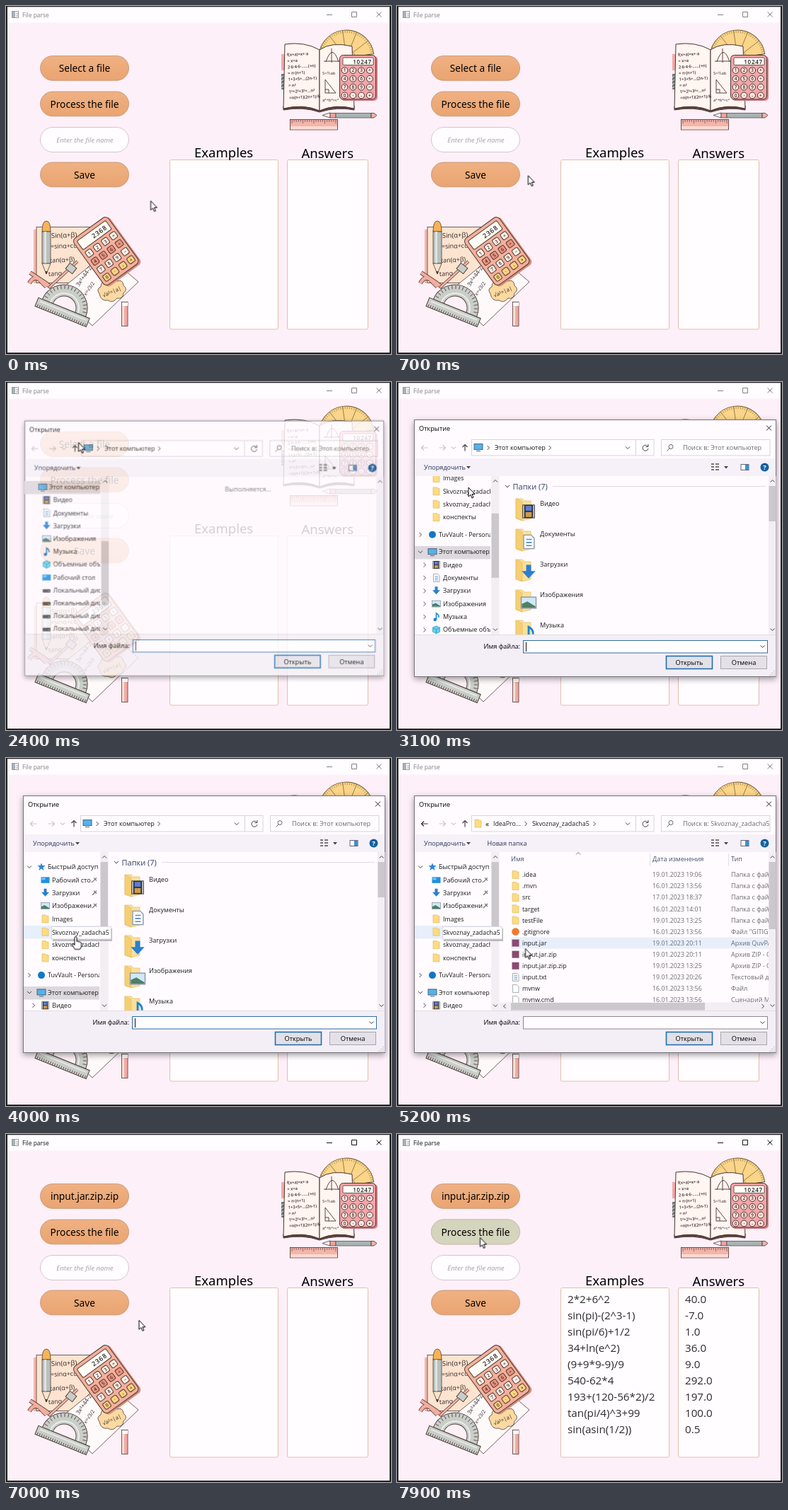
An HTML page for the animation above (8 s loop, 544 by 492 pixels).

```html
<!DOCTYPE html>
<html lang="ru">
<head>
<meta charset="utf-8">
<title>File parse</title>
<style>
html, body { margin: 0; width: 100%; height: 100%; overflow: hidden; background: #222; }
svg { display: block; width: 544px; height: 492px; font-family: "Open Sans", "Noto Sans", sans-serif; }
text { white-space: pre; }
.hand { font-family: "Noto Sans", "Open Sans", sans-serif; }
.note { fill: #33262a; }
.mid { text-anchor: middle; }
.step { animation: 8s step-end infinite; }
#cursor { animation: move 8s ease-in-out infinite; }
#dialog { animation: dialog 8s linear infinite; transform-origin: 280px 235px; }
#tree { animation: scroll 8s linear infinite; }
#thumb { animation: thumb 8s linear infinite; }
@keyframes move {
  0%, 5% { transform: translate(204.5px, 275.5px); }
  17.5%, 35% { transform: translate(102.5px, 85.5px); }
  43.75%, 58.75% { transform: translate(98.5px, 252.5px); }
  65%, 67.5% { transform: translate(181.5px, 269.5px); }
  70%, 85% { transform: translate(202.5px, 287.5px); }
  93.75%, 100% { transform: translate(117.5px, 146.5px); }
}
@keyframes dialog {
  0%, 28.75% { opacity: 0; transform: scale(.975); }
  30% { opacity: .83; transform: scale(.992); }
  31.25%, 72.5% { opacity: 1; transform: none; }
  73.75% { opacity: .4; transform: scale(.985); }
  75%, 100% { opacity: 0; transform: scale(.97); }
}
@keyframes scroll {
  0%, 36.25% { transform: translateY(-183.5px); }
  41.25%, 100% { transform: none; }
}
@keyframes thumb {
  0%, 36.25% { transform: translateY(78px); }
  41.25%, 100% { transform: none; }
}
</style>
</head>
<body>
<svg id="stage" viewBox="0 0 544 492"></svg>
<script>
const LOOP = 8000;
let rules = '', count = 0;

// Visible only between two times of the loop
function during(from, to, html) {
  const name = 'show' + count++, pc = ms => ms / LOOP * 100 + '%';
  rules += `@keyframes ${name}{0%{opacity:0}${pc(from)}{opacity:1}${pc(to)}{opacity:0}}`;
  return `<g class="step" style="animation-name:${name}">${html}</g>`;
}
const rect = (x, y, w, h, fill, more = '') =>
  `<rect x="${x}" y="${y}" width="${w}" height="${h}" fill="${fill}" ${more}/>`;
const path = (d, stroke = '#333', fill = 'none', w = 1) =>
  `<path d="${d}" stroke="${stroke}" fill="${fill}" stroke-width="${w}"/>`;
const dot = (x, y, r, fill, more = '') => `<circle cx="${x}" cy="${y}" r="${r}" fill="${fill}" ${more}/>`;
const text = (x, y, s, size, more = '') => `<text x="${x}" y="${y}" font-size="${size}" ${more}>${s}</text>`;
const label = (x, y, s, fill = '#1c1c1c') =>
  text(x, y + 3.2, s, /[а-я]/i.test(s) ? 9.1 : 8.8, `fill="${fill}"`);
const at = (x, y, html, more = '') => `<g transform="translate(${x} ${y}) ${more}">${html}</g>`;
const chevron = (x, y, turn = 0, c = '#444') => at(x, y, path('M-3-1.5 0 1.5 3-1.5', c), `rotate(${turn})`);
const range = (n, f) => Array.from({ length: n }, (_, i) => f(i)).join('');

// Short marks on an upper half circle, pointing inwards
const ticks = (n, outer, inner) => range(n - 1, i => {
  const a = Math.PI * (i + 1) / n, x = Math.cos(a), y = -Math.sin(a);
  return `M${outer * x} ${outer * y}L${inner * x} ${inner * y}`;
});

function titleBar(c) {
  return text(23, 15.6, 'File parse', 8.5, `fill="${c}"`) +
    path('M453 12.5H461M488.5 8.5h7v7h-7zM523.5 8.5l7 7m0-7-7 7', c);
}

function keys(chars, gap, draw) {
  return [...chars].map((ch, i) => {
    const col = i % 4, row = i >> 2;
    return at(col * gap, row * gap, draw(row, col) + text(0, 2.4, ch, 6.5, 'class="mid" font-weight="600" fill="#4a2626"'));
  }).join('');
}

function notebookArt() {
  const lines = ['f(x+a)=x+·a', '= x+a', '2·6·4·6·……(+n)', '= n·(n+1)', '1+3+5+…(2n-1)', '= n²', '1²+2²+3²+…n²', '=n(n+1)(2n+1)/6'];
  const line = '#4a3330';
  return rect(389, 68, 8, 23, '#f3a9a4') + rect(389, 96, 8, 22, '#6d7672') +
    path('M389 101l8-5m-8 10 8-5m-8 10 8-5m-8 10 8-5m-8 10 8-5', '#e6e9e6') +
    at(481, 73,
      path('M-39 0A39 39 0 0 1 39 0Z', '#6d5632', '#fad58a') +
      path(ticks(6, 39, 12), '#8a6d3c', 'none', .8) + path(ticks(36, 38, 35), '#8a6d3c', 'none', .6) +
      path('M-12 0A12 12 0 0 1 12 0', '#8a6d3c', '#fdeccb', .8), 'rotate(-8)') +
    path('M392 142V147Q420 142 443 150 468 142 492 147V141Z', line, '#5e433e') +
    path('M394 54Q422 50 443 62V148Q420 138 392 145Z', line, '#fff5f1') +
    path('M443 62Q460 50 489 57L492 145Q466 138 443 148Z', line, '#fff5f1') +
    lines.map((s, i) => text(398, 71 + i * 8.7, s, 5.8, 'class="note" font-weight="600" transform="rotate(-3 398 90)"')).join('') +
    path('M452 79Q461 52 470 79M449 78H471M460 60V80M451 123V104L466 123ZM451 118h5v5', line, 'none', .9) +
    text(447, 97, 'S=½ab', 6, 'class="note"') + text(447, 135, 'a²+b²=c²', 6, 'class="note"') +
    rect(473, 71, 52, 63, '#d97f86', 'rx="5"') +
    rect(471.5, 69.5, 51, 62.5, '#f3a5a9', `rx="5" stroke="${line}"`) +
    rect(476, 73, 43, 10.5, '#fffdf8', `rx="1.5" stroke="${line}" stroke-width=".8"`) +
    text(517, 81.5, '10247', 8, 'text-anchor="end" letter-spacing=".8" font-weight="600" fill="#222"') +
    at(478.5, 91, keys('123+456÷789−0·-+', 11.8, () => dot(0, 0, 4.4, '#fde6e0', `stroke="${line}"`))) +
    rect(401.5, 160.5, 67, 14.5, '#f4b4aa', `stroke="${line}" stroke-width=".8"`) + rect(402, 170, 66, 4.5, '#fbd9d0') +
    path(range(21, i => `M${404 + i * 3.1} 161v${i % 5 ? 3 : 5}`), line, 'none', .6) +
    path('M447 154.5 458 151V158Z', line, '#fff', .8) + rect(458, 151.5, 8, 6.5, '#efa39b', `stroke="${line}" stroke-width=".7"`) +
    rect(466, 151.5, 50, 6.5, '#a9b4b2', 'stroke="#4d5555" stroke-width=".8"') +
    path('M516 151.5h4l4 3-4 3.5h-4z', line, '#f3b0a8', .8);
}

function deskArt() {
  const line = '#513c36', shades = ['#fff3ea', '#ea9480', '#fff3ea', '#fbd37c'];
  const note = (x, y, s, a, size = 9) => text(x, y, s, size, `class="note" transform="rotate(${a} ${x} ${y})"`);
  return rect(39, 316, 80, 76, '#f2b8ae') + rect(43, 312.5, 82, 79, '#fce4d0', `stroke="${line}" stroke-width=".8"`) +
    note(64, 328, 'Sin(α+β)', -2, 9.5) + note(63, 343, '=sinα+cos', -2) + note(62, 363, 'tan(α+β)', -3) + note(60, 382, 'tanα', -3) +
    path('M140 350 187 390 122 452 72 405Z', line, '#fffafa', .8) +
    note(103, 397, '3x²+44-2', -55, 8) + note(113, 410, 'x=√3/2', -55, 7) +
    path('M132 407Q127 400 134 397 134 388 143 391 150 384 157 389 165 386 166 395 173 401 166 406 165 415 157 413 151 421 144 416 134 418 132 407Z', line, '#fbd9a0', .8) +
    note(138, 412, '√a²=|a|', -24, 7.5) +
    path('M34 377 55 391 64 398M33 392Q38 382 46 386L57 397', line, 'none', 6) +
    path('M34 377 55 391 64 398M33 392Q38 382 46 386L57 397', '#f2ada0', 'none', 4.4) +
    path('M61 398 101 361', line, 'none', 4) + path('M61 398 101 361', '#f3b5a5', 'none', 2.6) +
    rect(-6, -5, 12, 10, '#c9ceca', `stroke="${line}" transform="translate(92 371) rotate(38)"`) +
    path('M51 319Q51 304 57 304 63 304 63 319Z', line, '#f6b457', .8) +
    rect(51, 319, 12, 45, '#b9c1bf', `stroke="${line}" stroke-width=".8"`) + rect(54, 319, 3, 45, '#dfe4e1') +
    path('M51 364H63L57 379Z', line, '#fae3cc', .8) + path('M55.6 375.5h2.8L57 379z', line, line) +
    at(82, 427,
      path('M-33 0A33 33 0 0 1 33 0Z', line, '#c9cec9') +
      path('M-17 0A17 17 0 0 1 17 0Z', line, '#fdf0f7', .9) +
      path('M-21 0A21 21 0 0 1 21 0', '#f2f4f0', 'none', 1.6) +
      rect(-39, 0, 78, 13, '#c9cec9', `stroke="${line}"`) + rect(-35, 3, 70, 2, '#e6e9e5') +
      path(ticks(18, 32, 27) + range(23, i => `M${i * 3.3 - 36} 13v-4`), line, 'none', .8), 'rotate(22)') +
    at(141.5, 347,
      rect(-29, -39, 61, 82, '#d58d7c', 'rx="6"') +
      rect(-30, -41, 60, 81, '#f3b09c', `rx="6" stroke="${line}"`) +
      rect(-25, -36, 50, 15, '#fffcf5', `rx="2" stroke="${line}"`) +
      text(21, -25, '2368', 9, 'text-anchor="end" letter-spacing="1" font-weight="600" fill="#222"') +
      at(-20.5, -12, keys('123×456÷789−0·-+', 14,
        (row, col) => rect(-4.7, -4.7, 9.4, 9.4, shades[row], `rx="2" stroke="${line}"`))),
      'rotate(-36)') +
    rect(163.5, 418.5, 8.5, 34, '#f2aaa2', `stroke="${line}" stroke-width=".8"`) + rect(164, 419, 3, 33, '#fbe0da') +
    rect(164, 419, 8, 5, '#fff');
}

function button(y, s, over = '') {
  return rect(48.5, y, 125, 34.8, 'url(#peach)', 'rx="17.4" stroke="#bd9270" stroke-width=".8"') + over + s;
}
const caption = (y, s) => text(111, y, s, 13.7, 'class="hand mid" font-weight="500"');
const hover = y => rect(48.5, y, 125, 34.8, '#d5d4bd', 'rx="17.4" stroke="#c6c5b0" stroke-width=".8"');

function mainWindow() {
  const sums = ['2*2+6^2', 'sin(pi)-(2^3-1)', 'sin(pi/6)+1/2', '34+ln(e^2)', '(9+9*9-9)/9', '540-62*4', '193+(120-56*2)/2', 'tan(pi/4)^3+99', 'sin(asin(1/2))'];
  const answers = ['40.0', '-7.0', '1.0', '36.0', '9.0', '292.0', '197.0', '100.0', '0.5'];
  const list = (x, items) => items.map((s, i) => text(x, 238.5 + i * 23, s, 15.2, 'fill="#2b2b2b"')).join('');
  const box = (x, w) => rect(x, 217.5, w, 239.5, '#fffdff', 'rx="2" stroke="#e3c0a8"');
  return rect(2, 1.5, 540, 488.5, '#fdf0f9') + rect(2, 1.5, 540, 22, '#fffdff') +
    rect(8.5, 7.5, 9, 9, '#fff', 'stroke="#999"') + rect(9, 8, 4, 8, '#a9b1b5') + path('M14 11h3m-3 3h3', '#999') +
    during(0, 6000, titleBar('#858085')) + during(6000, LOOP, titleBar('#151515')) +
    button(70.5, during(0, 6200, caption(93, 'Select a file')) + during(6200, LOOP, caption(93, 'input.jar.zip.zip')), during(1300, 2300, hover(70.5))) +
    button(121, caption(144, 'Process the file'), during(7400, LOOP, hover(121))) +
    rect(48.5, 171.5, 125, 35, '#fffdff', 'rx="17.5" stroke="#cfc6cd"') +
    text(111.5, 193, 'Enter the file name', 9.6, 'class="hand mid" font-style="italic" fill="#aaa4aa"') +
    button(221, caption(244, 'Save')) +
    box(231.5, 153) + box(397.5, 114) +
    text(266, 213.5, 'Examples', 18.5, 'class="hand"') + text(417.5, 215, 'Answers', 18.5, 'class="hand"') +
    during(7800, LOOP, list(241, sums) + list(407, answers)) +
    notebookArt() + deskArt();
}

const icons = {
  star: path('M0-5.5 1.6-2H5.5L2.5.8 3.6 5 0 2.6-3.6 5-2.5.8-5.5-2H-1.6Z', 'none', '#2f86d6'),
  pc: rect(-6, -4.5, 12, 8, '#55b2ea', 'stroke="#4b6478"') + path('M-3 5.5H3', '#4b6478'),
  desk: rect(-6, -4, 12, 8.5, '#1f8fe0') + rect(-5, -3, 5, 3, '#78c4f5'),
  down: path('M-2-6H2V-1H5.5L0 5-5.5-1H-2Z', 'none', '#2a7fd0'),
  pic: rect(-6, -4.5, 12, 9, '#cfe8fa', 'stroke="#8a98a4" stroke-width=".8"') + path('M-5.5 4V1L-1-1 5.5 3V4Z', 'none', '#4f7e68'),
  folder: path('M-4.5-5.5H1L2-4H4.5V5.5H-4.5Z', '#e0b450', '#fbdc83', .6),
  film: rect(-5, -5.5, 10, 11, '#2d2d35') + rect(-2.5, -4.5, 5, 4, '#5b7fd0') + rect(-2.5, .5, 5, 4, '#d09a4a') + path('M-4-5V5M4-5V5', '#eee', 'none', .8),
  doc: path('M-4-5.5H2L4.5-3V5.5H-4Z', '#8796a5', '#fff', .8) + path('M-2-2H2.5M-2 .5H2.5M-2 3H2.5', '#4b8bc4', 'none', .9),
  page: path('M-4-5.5H2L4.5-3V5.5H-4Z', '#9a9aa2', '#fff', .8),
  note: path('M0 4V-5Q4-3 3.5 1', '#1983d2', 'none', 1.6) + dot(-1.7, 4, 2.3, '#1983d2'),
  cube: path('M0-5.5 5-3V3L0 5.5-5 3V-3Z', '#2f9fc5', '#6bd0e9', .8) + path('M-5-3 0 0 5-3M0 0V5', '#2f9fc5'),
  disk: rect(-5.5, -1.5, 11, 5, '#4d4f55', 'rx="1"') + rect(2, 1, 2, 1, '#8fe08f'),
  cloud: dot(0, 0, 5, '#1576c8'),
  orb: dot(0, 0, 5.3, '#ee7b2d'),
  pack: rect(-5, -5, 10, 10, '#8a4a72')
};
const icon = (name, x, y, k = 1) => at(x, y, icons[name], `scale(${k})`);

function sidebar() {
  const items = [
    [0, 'star', 'Быстрый доступ'], [1, 'desk', 'Рабочий сто.'], [1, 'down', 'Загрузки'], [1, 'pic', 'Изображени'],
    [1, 'folder', 'Images'], [1, 'folder', 'Skvoznay_zadacha5'], [1, 'folder', 'skvoznay_zadacha'], [1, 'folder', 'конспекты'],
    [0, 'cloud', 'TuvVault - Personal'], [0, 'pc', 'Этот компьютер'], [1, 'film', 'Видео'], [1, 'doc', 'Документы'],
    [1, 'down', 'Загрузки'], [1, 'pic', 'Изображения'], [1, 'note', 'Музыка'], [1, 'cube', 'Объемные объекты'],
    [1, 'desk', 'Рабочий стол'], ...Array(4).fill([1, 'disk', 'Локальный диск'])];
  const rowY = i => 154 + i * 18.35 + (i > 7) * 6.3 + (i > 8) * 6;
  const rows = items.map(([level, pic, name], i) => {
    const y = rowY(i);
    const pin = i > 0 && i < 4 ? path(`M122 ${y + 3}l3-3m-1-3 4 4m-3-1 3-3`, '#777', 'none', 1.3) : '';
    return icon(pic, level ? 55.5 : 50, y) + label(level ? 65 : 59, y, name) + pin;
  }).join('');
  const arrows = items.map(([level], i) =>
    level ? (i > 9 ? chevron(39, rowY(i), -90) : '') : chevron(33, rowY(i), i === 8 ? -90 : 0)).join('');
  return `<g clip-path="url(#side)"><g id="tree">` +
    during(0, 4500, rect(24, 323, 109, 18.5, '#dcd8de')) + during(3500, LOOP, rect(24, 237, 109, 18.5, '#e6effb')) +
    rows + during(2900, LOOP, arrows) + '</g></g>' +
    rect(133, 133, 11.5, 224, '#f2eef3') + `<g id="thumb">${rect(133.5, 147, 10.5, 91, '#cbc7cd')}</g>` +
    chevron(139, 140, 180) + chevron(139, 350);
}

function folderView() {
  const items = [['film', 'Видео'], ['doc', 'Документы'], ['down', 'Загрузки'], ['pic', 'Изображения'], ['note', 'Музыка']];
  return chevron(156, 147.5) + text(163.5, 151.5, 'Папки (7)', 11, 'fill="#33406b"') + path('M220 147.5H521', '#dfdbe3') +
    items.map(([pic, name], i) => {
      const y = 179 + i * 43;
      return path(`M168 ${y - 14}h9l3 3h9v25l-12 3-9-3z`, '#e3bd62', '#fbe09a', .7) +
        path(`M168 ${y - 14}l9 4v27l-9-4z`, '#e3bd62', '#f6cf73', .7) + icon(pic, 186, y + 4, 1.75) + label(202, y - 7, name);
    }).join('');
}

function fileView() {
  const dir = 'Папка с файлами', zip = 'Архив ZIP - QuvPAX';
  const files = [
    ['folder', '.idea', '19.01.2023 19:06', dir], ['folder', '.mvn', '16.01.2023 13:56', dir], ['folder', 'src', '17.01.2023 18:37', dir],
    ['folder', 'target', '16.01.2023 14:01', dir], ['folder', 'testFile', '19.01.2023 13:25', dir],
    ['orb', '.gitignore', '16.01.2023 13:56', 'Файл "GITIGNORE"'], ['pack', 'input.jar', '19.01.2023 20:11', 'Архив QuvPAX'],
    ['pack', 'input.jar.zip', '19.01.2023 20:11', zip], ['pack', 'input.jar.zip.zip', '19.01.2023 13:25', zip],
    ['doc', 'input.txt', '19.01.2023 20:26', 'Текстовый документ'], ['page', 'mvnw', '16.01.2023 13:56', 'Файл'],
    ['page', 'mvnw.cmd', '16.01.2023 13:56', 'Сценарий Morvex']];
  const mark = (i, c) => rect(161, 157 + i * 16.1, 364, 16, c);
  return chevron(256, 135, 180, '#777') + label(161, 143, 'Имя', '#44506e') + label(361, 143, 'Дата изменения', '#44506e') + label(472, 143, 'Тип', '#44506e') +
    path('M357.5 135V153M468.5 135V153', '#e2dee5') +
    during(5100, 5500, mark(6, '#e8effb')) + during(5500, 5600, mark(8, '#e8effb')) + during(5600, LOOP, mark(8, '#cce4fa')) +
    files.map(([pic, name, date, kind], i) => {
      const y = 165 + i * 16.1;
      return icon(pic, 167.5, y) + label(177, y, name) + label(361, y, date, '#6d6a70') + label(472, y, kind, '#6d6a70');
    }).join('') +
    rect(145, 345.5, 380, 11.5, '#f2eef3') + rect(161, 346, 274, 10.5, '#cbc7cd') + chevron(152, 351, 90) + chevron(517, 351, -90);
}

function dialog() {
  const arrow = (x, turn, c) => at(x, 93, path('M4.5 0H-4.5M-1-3.5-4.5 0-1 3.5', c, 'none', 1.2), `rotate(${turn})`);
  const input = c => rect(178.5, 365.5, 345, 17.5, '#fffdff', `stroke="${c}"`);
  const early = [2000, 4500], late = [4500, LOOP];
  return rect(24.5, 53.5, 511, 363, '#fffbff', 'stroke="#77737a" filter="url(#shadow)"') +
    text(31, 68.8, 'Открытие', 9.2) + path('M522 61.5l7 7m0-7-7 7', '#222') +
    arrow(64, 180, '#c9c5cb') + chevron(80, 93, 0, '#aaa') + arrow(96, 90, '#444') +
    rect(105.5, 81.5, 257.5, 22.5, '#fffdff', 'stroke="#d8d3da"') + path('M337.5 82V104', '#d8d3da') + chevron(326, 93) +
    path('M354 90.5A4 4 0 1 0 355 94M355 88V91.5H351.5', '#444') +
    rect(373.5, 81.5, 153.5, 22.5, '#fffdff', 'stroke="#d8d3da"') + dot(387, 91.5, 3, 'none', 'stroke="#666"') + path('M385 94l-3.5 3.5', '#666') +
    rect(25, 108, 510, 25, '#f6f1f8') + label(38, 120.5, 'Упорядочить', '#28355c') + path('M98 119h6l-3 3.5z', 'none', '#444') +
    path('M444 116h4m2 0h5m-11 4h4m2 0h5m-11 4h4m2 0h5', '#777', 'none', 2) + path('M462 119h6l-3 3.5z', 'none', '#444') +
    rect(486, 116.5, 11, 8, '#fff', 'stroke="#667"') + rect(492, 117, 5, 7, '#3f8fcf') +
    dot(519.5, 120.5, 6, '#12609f') + text(519.5, 124, '?', 9.5, 'class="mid" fill="#fff" font-weight="700"') +
    rect(525, 133, 10.5, 224, '#f2eef3') + chevron(530.5, 140, 180) + chevron(530.5, 350) +
    sidebar() +
    during(...early, arrow(39, 0, '#c9c5cb') + icon('pc', 115, 92) + chevron(129, 93, -90) + label(138, 93, 'Этот компьютер') +
      chevron(216, 93, -90) + label(404, 93, 'Поиск в: Этот компьютер', '#6d6a70')) +
    during(...late, arrow(39, 0, '#333') + icon('folder', 114.5, 92.5) + text(125, 96.5, '«', 10) + label(136, 93, 'IdeaPro...') +
      chevron(182, 93, -90) + label(191, 93, 'Skvoznay_zadacha5') + chevron(279, 93, -90) +
      label(404, 93, 'Поиск в: Skvoznay_zadacha5', '#6d6a70') + label(127.5, 120.5, 'Новая папка', '#28355c')) +
    '<g clip-path="url(#pane)">' +
    during(2000, 2600, label(309.5, 151, 'Выполняется...', '#6d6a70')) +
    during(2600, 4500, folderView()) + during(...late, fileView()) + '</g>' +
    during(2600, 4500, rect(525.5, 147, 10, 50, '#cbc7cd')) + during(...late, rect(525.5, 147, 10, 95, '#cbc7cd')) +
    rect(25, 357, 510.5, 59, '#f4eff6') + path('M25 357.5H535', '#e2dde4') +
    text(174, 376.8, 'Имя файла:', 9.2, 'text-anchor="end"') +
    during(...early, input('#2f6ea5') + path('M182.5 368V381', '#111')) + during(...late, input('#8c8790')) +
    during(5600, LOOP, label(182, 374, 'input.jar.zip.zip')) + chevron(516.5, 374) +
    rect(380.5, 387.5, 65, 18, '#e4e0e7', 'stroke="#1f6fb2" stroke-width="1.6"') + text(413, 400, 'Открыть', 9.3, 'class="mid"') +
    rect(457.5, 387.5, 65, 18, '#e4e0e7', 'stroke="#aaa5ad"') + text(490, 400, 'Отмена', 9.3, 'class="mid"') +
    path('M533 408v1m0 2v1m0 2v1m-3-4v1m0 2v1m-3-1v1', '#aaa', 'none', 1.4) +
    during(3700, 5500, rect(66, 241, 84, 18, '#8d8990', 'opacity=".55"') + rect(64.5, 238.5, 84, 17.5, '#fffdff', 'stroke="#d5d0d8" stroke-width=".8"') +
      label(65, 246.5, 'Skvoznay_zadacha5'));
}

function cursor() {
  const arrow = path('M0 0V13L3 10.3 5 15 7 14 5 9.5H9Z', '#000', '#fff');
  const finger = path('M-1.6 1Q0-1 1.6 1V7Q3.2 5.8 4 7.4 5.6 6.4 6.2 8.2 8.2 7.6 8 10V14L6 18H-1L-5 12Q-6 9.6-4 10L-1.6 12Z', '#000', '#fff');
  return during(0, 3500, arrow) + during(3500, 4700, finger) + during(4700, LOOP, arrow);
}

document.getElementById('stage').innerHTML = `<defs>
  <linearGradient id="peach" x2="0" y2="1"><stop stop-color="#f0b183"/><stop offset="1" stop-color="#e9a471"/></linearGradient>
  <clipPath id="side">${rect(25, 133, 107, 224, '#000')}</clipPath>
  <clipPath id="pane">${rect(145, 133, 380, 224, '#000')}</clipPath>
  <filter id="shadow" x="-5%" y="-5%" width="110%" height="112%"><feDropShadow dx="0" dy="3" stdDeviation="4" flood-opacity=".38"/></filter>
  </defs>${mainWindow()}<g id="dialog">${dialog()}</g><g id="cursor">${cursor()}</g>`;
document.head.appendChild(document.createElement('style')).textContent = rules;
</script>
</body>
</html>
```
